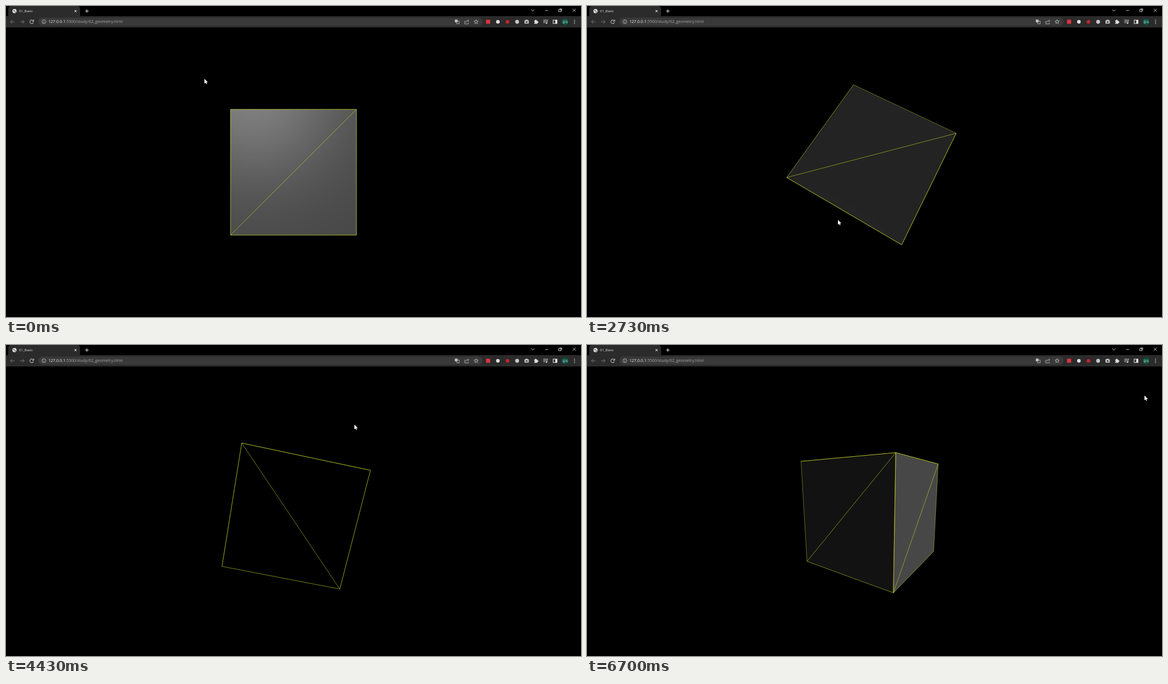
Animation, 1017 px wide and 551 px high, one loop 6.73 s. Source, as an HTML page with a canvas:

```html
<!DOCTYPE html>
<html lang="en">
<head>
<meta charset="utf-8">
<title>Cube</title>
<style>
  html, body { margin: 0; width: 100%; height: 100%; overflow: hidden; background: #000; }
  canvas { position: absolute; left: 0; top: 0; width: 1017px; height: 551px; }
</style>
</head>
<body>
<canvas id="scene"></canvas>
<canvas id="chrome"></canvas>
<script>
const W = 1017, H = 551, LOOP = 6730, RAD = Math.PI / 180;

function context(id) {
  const canvas = document.getElementById(id), ratio = window.devicePixelRatio || 1;
  canvas.width = Math.round(W * ratio);
  canvas.height = Math.round(H * ratio);
  const c = canvas.getContext('2d');
  c.scale(ratio, ratio);
  return c;
}

const g = context('scene');
const ui = context('chrome');

// ---- motion: [time, x, y] and [time, azimuth, elevation] ----
const pointerKeys = [
  [0, 351, 129], [400, 325, 165], [1030, 278, 255], [1200, 278, 255],
  [1870, 470, 264], [2030, 486, 263], [2150, 486, 263], [2300, 451, 286],
  [2430, 427, 312], [2600, 425, 355], [2800, 460, 384], [3000, 520, 384],
  [3200, 584, 360], [3600, 688, 280], [3830, 707, 238], [3960, 716, 208],
  [4230, 675, 158], [4430, 616.5, 141], [4570, 568, 140], [4850, 470, 165],
  [5050, 432, 205], [5240, 423, 248], [5400, 440, 270], [5600, 500, 282],
  [5750, 555, 279], [5850, 566, 273], [6000, 620, 255], [6340, 980, 93],
  [6700, 986, 89.5]
];
const orbitKeys = [
  [2150, 0, 0], [2300, 19.3, 13.4], [2460, 38, 27], [2620, 40, 54],
  [2800, 19, 82], [2900, 4, 87], [3000, -14, 85], [3200, -56.5, 74],
  [3400, -98, 49], [3600, -134, 19], [3830, -151, -14.4], [4000, -155, -39],
  [4200, -141, -66], [4430, -101.8, -81.8], [4600, -64, -87], [4750, -28, -80],
  [4900, 6, -63], [5050, 31, -42], [5240, 45, -14.4], [5400, 37, 0],
  [5550, 6, 8.5], [5700, -32, 11.5], [5850, -53, 10], [5950, -56.35, 9.1]
];

// Monotone cubic interpolation
function sample(keys, t, k) {
  const last = keys.length - 1;
  if (t <= keys[0][0]) return keys[0][k];
  if (t >= keys[last][0]) return keys[last][k];
  let i = 0;
  while (t >= keys[i + 1][0]) i++;
  const slope = j => j < 0 || j >= last ? 0 :
    (keys[j + 1][k] - keys[j][k]) / (keys[j + 1][0] - keys[j][0]);
  const tangent = j => {
    const p = slope(j - 1), q = slope(j);
    return p * q <= 0 ? 0 : 2 * p * q / (p + q);
  };
  const span = keys[i + 1][0] - keys[i][0], s = (t - keys[i][0]) / span, r = 1 - s;
  return r * r * (1 + 2 * s) * keys[i][k] + s * s * (3 - 2 * s) * keys[i + 1][k] +
    span * s * r * (r * tangent(i) - s * tangent(i + 1));
}

// ---- cube ----
const CX = 508.5, CY = 294.5, DIST = 2;
const FOCAL = 256.5 / Math.tan(37.5 * RAD);
const LIGHT = [-1, 2, 4].map(v => v / Math.sqrt(21));
const dot = (a, b) => a[0] * b[0] + a[1] * b[1] + a[2] * b[2];

function makeFace(axis, sign, u, v, uDir, vDir) {
  const normal = [0, 0, 0];
  normal[axis] = sign;
  const corners = [[-1, -1], [-1, 1], [1, 1], [1, -1]].map(([a, b]) => {
    const p = [0, 0, 0];
    p[axis] = sign / 2;
    p[u] = a * uDir / 2;
    p[v] = b * vDir / 2;
    return p;
  });
  return { normal, corners };
}

const faces = [
  makeFace(0, 1, 2, 1, -1, -1), makeFace(0, -1, 2, 1, 1, -1),
  makeFace(1, 1, 0, 2, 1, 1), makeFace(1, -1, 0, 2, 1, -1),
  makeFace(2, 1, 0, 1, 1, -1), makeFace(2, -1, 0, 1, -1, -1)
];

function makeCamera(az, el) {
  const sa = Math.sin(az), ca = Math.cos(az), se = Math.sin(el), ce = Math.cos(el);
  const back = [sa * ce, se, ca * ce];
  return {
    right: [ca, 0, -sa],
    up: [-sa * se, ce, -ca * se],
    back,
    pos: back.map(v => v * DIST)
  };
}

function project(cam, p) {
  const k = FOCAL / (DIST - dot(cam.back, p));
  return [CX + dot(cam.right, p) * k, CY - dot(cam.up, p) * k];
}

const STEP = 3, REACH = 168, CELLS = 2 * REACH / STEP;
const shade = document.createElement('canvas');
shade.width = shade.height = CELLS;
const shadeCtx = shade.getContext('2d');
const shadeData = shadeCtx.createImageData(CELLS, CELLS);

// Blinn-Phong with a Fresnel term, one directional light
function lightFace(cam, n, nl) {
  const px = shadeData.data;
  let o = 0;
  for (let j = 0; j < CELLS; j++) {
    const y = (REACH - (j + 0.5) * STEP) / FOCAL;
    for (let i = 0; i < CELLS; i++) {
      const x = ((i + 0.5) * STEP - REACH) / FOCAL;
      const len = Math.sqrt(1 + x * x + y * y);
      const v = [0, 1, 2].map(k => (cam.back[k] - cam.right[k] * x - cam.up[k] * y) / len);
      const lv = dot(LIGHT, v), half = Math.sqrt(Math.max(1e-6, 2 + 2 * lv));
      const nh = Math.min(1, Math.max(0, (nl + dot(n, v)) / half));
      const vh = Math.max(0, (1 + lv) / half);
      const fresnel = 0.0667 + 0.9333 * Math.pow(2, (-5.55473 * vh - 6.98316) * vh);
      const c = 255 * nl * (0.3176 + 4 * fresnel * Math.pow(nh, 30));
      px[o] = px[o + 1] = px[o + 2] = c;
      px[o + 3] = 255;
      o += 4;
    }
  }
  shadeCtx.putImageData(shadeData, 0, 0);
}

function trace(c, points) {
  c.beginPath();
  points.forEach(([x, y], i) => i ? c.lineTo(x, y) : c.moveTo(x, y));
}

function edge(a, b, alpha) {
  trace(g, [a, b]);
  g.strokeStyle = `rgba(208, 222, 40, ${alpha})`;
  g.stroke();
}

function drawCube(az, el) {
  const cam = makeCamera(az * RAD, el * RAD);
  const visible = faces.filter(f => dot(cam.pos, f.normal) > 0.5);
  for (const f of visible) {
    f.points = f.corners.map(p => project(cam, p));
    const nl = dot(f.normal, LIGHT);
    trace(g, f.points);
    g.closePath();
    g.fillStyle = '#000';
    g.fill();
    if (nl <= 0) continue;
    lightFace(cam, f.normal, nl);
    g.save();
    g.clip();
    g.drawImage(shade, CX - REACH, CY - REACH, 2 * REACH, 2 * REACH);
    g.restore();
  }
  g.lineWidth = 0.9;
  for (const f of visible) {
    f.corners.forEach((p, i) => {
      const j = (i + 1) % 4, q = f.corners[j];
      const side = p.map((v, k) => v + q[k] - f.normal[k]);
      const d = dot(cam.pos, side) - 0.5;
      // Outlines fade where the neighbouring side turns far away
      const alpha = d > 0 ? 0.65 : Math.min(0.95, Math.max(0.5, 1.15 + 0.65 * d));
      edge(f.points[i], f.points[j], alpha);
    });
    edge(f.points[1], f.points[3], 0.62);
  }
}

function drawPointer(x, y) {
  const shape = [[0, 0], [0, 8.6], [2, 6.8], [3.3, 9.6], [4.6, 9], [3.4, 6.3], [6, 6.2]];
  trace(g, shape.map(([a, b]) => [x + a, y + b]));
  g.closePath();
  g.lineJoin = 'round';
  g.lineWidth = 0.8;
  g.strokeStyle = '#000';
  g.stroke();
  g.fillStyle = '#fff';
  g.fill();
}

// ---- browser frame ----
function box(x, y, w, h, r, color) {
  ui.beginPath();
  ui.roundRect(x, y, w, h, r);
  ui.fillStyle = color;
  ui.fill();
}

function disc(x, y, r, color) {
  ui.beginPath();
  ui.arc(x, y, r, 0, 7);
  ui.fillStyle = color;
  ui.fill();
}

function ring(x, y, r, color, from = 0, to = 7) {
  ui.beginPath();
  ui.arc(x, y, r, from, to);
  ui.strokeStyle = color;
  ui.stroke();
}

function line(color, ...points) {
  trace(ui, points);
  ui.strokeStyle = color;
  ui.stroke();
}

function label(text, x, y, size, color) {
  ui.font = `${size}px "Open Sans", "Noto Sans CJK KR", sans-serif`;
  ui.fillStyle = color;
  ui.fillText(text, x, y);
  return ui.measureText(text).width;
}

function arrow(x, dir, color) {
  line(color, [x - 3.6 * dir, 28], [x + 3.6 * dir, 28]);
  line(color, [x + 0.4 * dir, 24.7], [x + 3.7 * dir, 28], [x + 0.4 * dir, 31.3]);
}

function drawTabs() {
  box(4, 0, 127, 24, [5, 5, 0, 0], '#2b2b2b');
  disc(15, 9, 3.7, '#e4e4e4');
  box(12.7, 7.4, 3, 1.6, 0.8, '#444');
  box(15, 9.8, 2.4, 1.5, 0.7, '#444');
  label('01_Basic', 23, 11.3, 6.1, '#e8e8e8');
  ui.lineWidth = 1;
  line('#e8e8e8', [121, 7], [125, 11]);
  line('#e8e8e8', [125, 7], [121, 11]);
  line('#e8e8e8', [139.8, 9], [146.2, 9]);
  line('#e8e8e8', [143, 5.8], [143, 12.2]);
  ui.lineWidth = 0.9;
  line('#ddd', [929, 6.3], [931.8, 9], [934.6, 6.3]);
  line('#ddd', [953.5, 8], [958.7, 8]);
  ui.strokeStyle = '#ddd';
  ui.strokeRect(977.8, 6.2, 3.8, 3.8);
  line('#ddd', [979.2, 5], [982.9, 5], [982.9, 8.7]);
  line('#ddd', [1002.4, 5], [1007.6, 10.2]);
  line('#ddd', [1007.6, 5], [1002.4, 10.2]);
}

function drawAddress() {
  ui.lineWidth = 1;
  arrow(11.5, -1, '#777');
  arrow(28.5, 1, '#777');
  ring(45.5, 28, 3.2, '#e4e4e4', 0.3, 5.4);
  line('#e4e4e4', [49, 24.3], [49, 27], [46.2, 27]);

  box(57, 20.5, 786, 14.5, 7.2, '#393939');
  ui.lineWidth = 0.8;
  ring(67, 27.8, 3.4, '#ccc');
  line('#ccc', [67, 27.4], [67, 29.8]);
  line('#ccc', [67, 25.7], [67, 26.4]);
  const host = label('127.0.0.1', 75, 30.3, 7.1, '#f2f2f2');
  label(':5500/study/02_geometry.html', 75 + host, 30.3, 7.1, '#a6a6a6');

  box(793.8, 24, 5, 5, 0.6, '#bbb');
  ui.strokeStyle = '#bbb';
  ui.strokeRect(797, 26.8, 4.6, 4.8);
  line('#bbb', [812.5, 27], [811.2, 27], [811.2, 31.7], [817.8, 31.7], [817.8, 29.5]);
  line('#bbb', [813.2, 29.4], [814.4, 26.5], [818.4, 26.3]);
  line('#bbb', [816.5, 24.3], [818.6, 26.3], [816.5, 28.3]);
  const star = Array.from({ length: 10 }, (_, i) => {
    const r = i % 2 ? 1.7 : 3.9, a = (i * 36 - 90) * RAD;
    return [831.5 + r * Math.cos(a), 28 + r * Math.sin(a)];
  });
  trace(ui, star);
  ui.closePath();
  ui.strokeStyle = '#ccc';
  ui.stroke();
}

function drawTools() {
  box(849, 24.2, 7.4, 7.2, 1, '#d8343f');
  disc(870, 28, 3.2, '#ddd');
  disc(887, 28, 3.2, '#c3262d');
  disc(904, 28, 3.4, '#c8c8c8');

  box(917, 25.2, 7.6, 6, 1, '#c4c4c4');
  box(919, 24.2, 3.6, 2, 0.5, '#c4c4c4');
  disc(920.8, 28.3, 1.6, '#444');

  box(934.2, 25.8, 5.8, 5.8, 0.6, '#ddd');
  disc(936.9, 25.5, 1.3, '#ddd');
  disc(940.4, 28.6, 1.3, '#ddd');
  disc(934.3, 28.8, 1, '#2b2b2b');

  ui.lineWidth = 0.9;
  line('#ddd', [950.3, 25], [956, 25]);
  line('#ddd', [950.3, 27.3], [956, 27.3]);
  line('#ddd', [950.3, 29.6], [953.6, 29.6]);
  line('#ddd', [958.8, 25], [957, 25], [957, 30.2]);
  disc(956, 30.3, 1.3, '#ddd');

  ui.lineWidth = 1;
  ui.strokeStyle = '#eee';
  ui.strokeRect(967.8, 25, 6.8, 6);
  box(971.5, 25, 3.2, 6, 0, '#eee');

  disc(988.8, 27.9, 6, '#0b5343');
  ui.textAlign = 'center';
  label('감자', 988.8, 29.9, 5, '#e6efec');
  ui.textAlign = 'left';
  for (const y of [25, 28, 31]) disc(1005.5, y, 0.85, '#ddd');
}

function drawChrome() {
  box(0, 0, W, 18, 0, '#000');
  box(0, 18, W, 20, 0, '#2b2b2b');
  drawTabs();
  drawAddress();
  drawTools();
}

function frame(now) {
  const t = now % LOOP;
  g.fillStyle = '#000';
  g.fillRect(0, 0, W, H);
  drawCube(sample(orbitKeys, t, 1), sample(orbitKeys, t, 2));
  drawPointer(sample(pointerKeys, t, 1), sample(pointerKeys, t, 2));
  requestAnimationFrame(() => frame(performance.now() - start));
}

drawChrome();
const start = performance.now();
frame(0);
</script>
</body>
</html>
```
